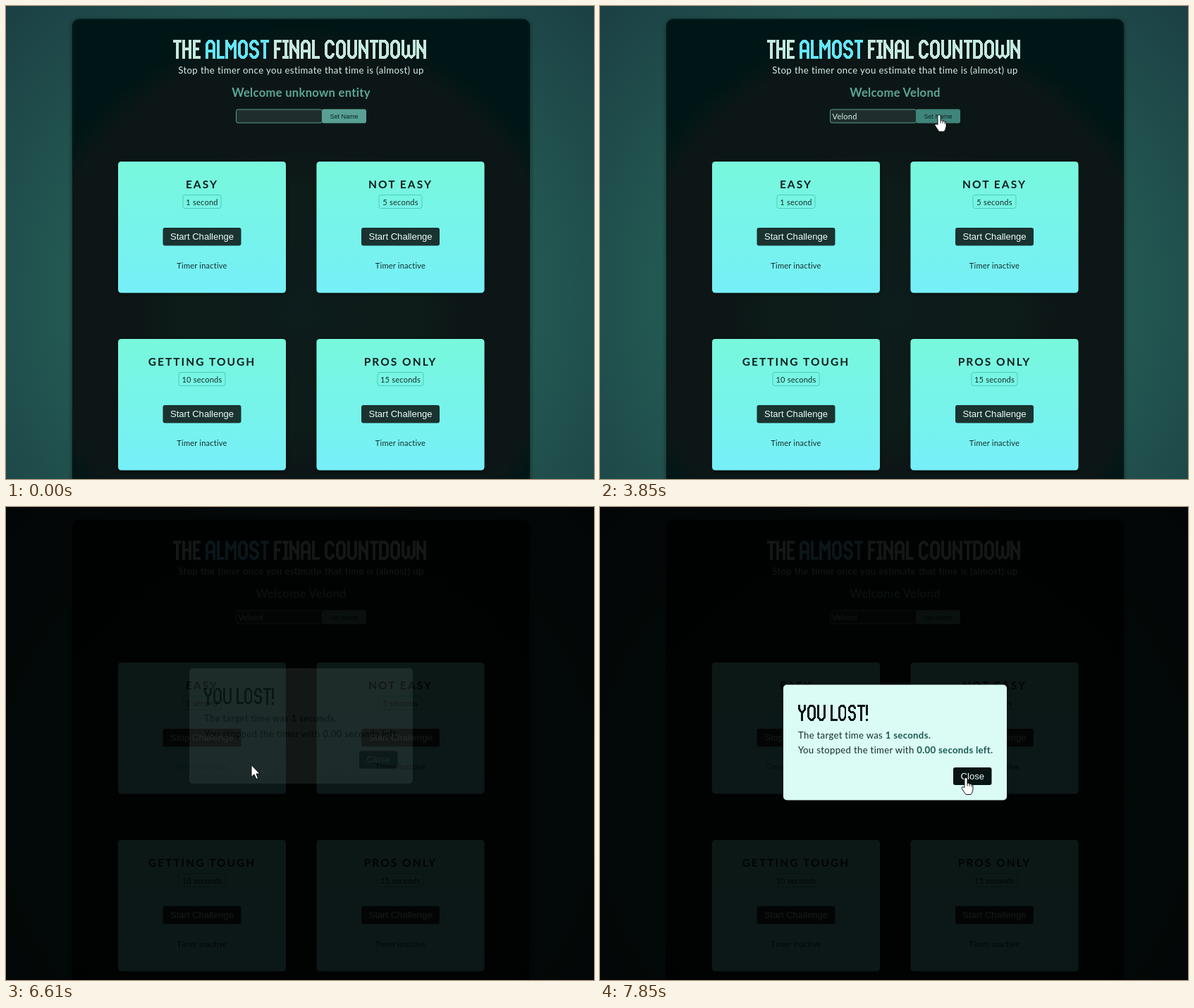
These frames come from a looping animation (834x672 px, 8000 ms). An HTML page:

```html
<!DOCTYPE html>
<html lang="en">
<head>
<meta charset="utf-8">
<title>Countdown challenge</title>
<style>
  html, body { margin: 0; height: 100%; overflow: hidden; background: #1b4246; }
  svg { display: block; width: 100vw; height: 100vh; }
  text { font-family: Lato, sans-serif; fill: #16302d; white-space: pre; }
  .mid { text-anchor: middle; }
  .lead { font-size: 13.2px; letter-spacing: .4px; fill: #d3f0e8; }
  .welcome { font-size: 16.6px; font-weight: 700; letter-spacing: .3px; fill: #5ba797; }
  .level { font-size: 15.5px; font-weight: 700; letter-spacing: 2.05px; fill: #0c1c1a; }
  .small { font-size: 11.1px; letter-spacing: .2px; }
  .button text { font-family: "Liberation Sans", Arial, sans-serif; font-size: 13.07px; fill: #edfcfa; text-anchor: middle; }
  .button rect { fill: #1a3330; }
  .button.hover rect { fill: #061413; }
  .button.set rect { fill: #58a094; }
  .button.set.hover rect { fill: #3f857b; }
  .button.set text { font-size: 9px; fill: #0b2622; }
  .result { font-size: 13.2px; letter-spacing: .3px; }
  .result tspan { font-weight: 700; fill: #195a50; }
  .pixel { fill: none; shape-rendering: crispEdges; }
  .cursor { fill: #fff; stroke: #111; stroke-width: 1; stroke-linejoin: round; }
</style>
</head>
<body>
<svg id="stage" viewBox="0 0 834 672">
  <defs>
    <radialGradient id="page" gradientUnits="userSpaceOnUse" cx="417" cy="410" r="620">
      <stop offset=".5" stop-color="#245a53"/><stop offset="1" stop-color="#1a3c42"/>
    </radialGradient>
    <radialGradient id="panel" gradientUnits="userSpaceOnUse" cx="418" cy="430" r="510">
      <stop offset="0" stop-color="#111d1a"/><stop offset="1" stop-color="#031418"/>
    </radialGradient>
    <linearGradient id="card" x2="0" y2="1">
      <stop offset="0" stop-color="#78f8dc"/><stop offset="1" stop-color="#76eff8"/>
    </linearGradient>
    <filter id="shadow" x="-10%" y="-10%" width="120%" height="120%">
      <feDropShadow dx="0" dy="1" stdDeviation="3" flood-opacity=".55"/>
    </filter>
  </defs>
</svg>
<script>
const LOOP = 8000;
const PLAYER = "Velond";
const stage = document.getElementById("stage");
const byId = id => document.getElementById(id);

// Stroke font on a 27-unit high cell: [advance, path]
const cap = "M2 8V6L5 2H9L12 6V8", cup = "M2 19V21L5 25H9L12 21V19";
const leftSide = "M2 6V21", rightSide = "M12 6V21", stem = "M2 0V27";
const glyphs = {
  T: [13, "M0 2H12M6 2V27"],
  H: [15, stem + "M11 0V27M2 13H11"],
  E: [12, "M11 2H2V25H11M2 13H9"],
  F: [12, "M11 2H2V27M2 13H9"],
  L: [12, "M2 0V25H11"],
  I: [10, "M0 2H9M0 25H9M4.5 2V25"],
  A: [16, cap + "M2 6V27M12 6V27M2 16H12"],
  M: [18, stem + "M14 0V27M2 3L8 12L14 3"],
  N: [16, stem + "M12 0V27M2 5L12 20"],
  O: [16, cap + cup + leftSide + rightSide],
  C: [16, cap + cup + leftSide],
  S: [16, cap + cup + "M2 7V9L5 13H9L12 17V20"],
  U: [16, cup + "M2 0V21M12 0V21"],
  D: [16, "M2 2H9L12 6V21L9 25H2Z"],
  W: [21, "M2 0V21L6 25L10 21V7M10 21L14 25L18 21V0"],
  Y: [15, "M2 0V8L6.5 14V27M11 0V8L6.5 14"],
  "!": [5, "M2 0V18M2 23V27"],
  " ": [6, ""]
};

function pixelText(words, x, y, scale, weight) {
  let pen = 0, out = "";
  for (const [word, color] of words)
    for (const letter of word) {
      const [advance, path] = glyphs[letter];
      out += `<path transform="translate(${pen})" stroke="${color}" d="${path}"/>`;
      pen += advance;
    }
  const label = words.map(w => w[0]).join("");
  return `<g class="pixel" role="img" aria-label="${label}" stroke-width="${weight}"
    transform="translate(${x} ${y}) scale(${scale})">${out}</g>`;
}

const buttons = [];
function button(id, label, x, y, w, h, kind = "") {
  buttons.push({ id, x, y, w, h });
  return `<g id="${id}" class="button ${kind}"><rect x="${x}" y="${y}" width="${w}" height="${h}" rx="3"/>
    <text x="${x + w / 2}" y="${y + h / 2 + (kind ? 3.2 : 4.3)}">${label}</text></g>`;
}

function card(index, title, target, boxWidth) {
  const x = index % 2 ? 440.5 : 159, y = index < 2 ? 221 : 473, mid = x + 119;
  return `<rect x="${x}" y="${y}" width="238" height="186.5" rx="4.5" fill="url(#card)" filter="url(#shadow)"/>
    <text class="mid level" x="${mid}" y="${y + 38}">${title}</text>
    <rect x="${mid - boxWidth / 2}" y="${y + 47.5}" width="${boxWidth}" height="19" rx="3"
      fill="none" stroke="#46c8b8" stroke-width=".9"/>
    <text class="mid small" x="${mid}" y="${y + 61.5}">${target}</text>
    ${button("start" + index, "Start Challenge", mid - 55.5, y + 94, 111, 25.5)}
    <text id="status${index}" class="mid small" x="${mid}" y="${y + 152}">Timer inactive</text>`;
}

stage.innerHTML += `
  <rect width="834" height="672" fill="url(#page)"/>
  <rect x="94" y="18.5" width="649" height="700" rx="10" fill="url(#panel)" filter="url(#shadow)"/>
  ${pixelText([["THE ", "#c4e8dd"], ["ALMOST ", "#62e6fb"], ["FINAL COUNTDOWN", "#c4e8dd"]], 237, 48, 1, 4)}
  <text class="mid lead" x="418.5" y="96">Stop the timer once you estimate that time is (almost) up</text>
  <text id="welcome" class="mid welcome" x="418.5" y="129"></text>
  <rect id="field" fill="#1f2e2c"/>
  ${button("set", "Set Name", 448, 146.5, 63, 20, "set")}
  <text id="typed" class="small" x="329.5" y="160.5" style="fill:#d7f3ec"></text>
  <rect id="caret" y="150" width="1" height="13" fill="#fff"/>
  ${card(0, "EASY", "1 second", 54)}
  ${card(1, "NOT EASY", "5 seconds", 61)}
  ${card(2, "GETTING TOUGH", "10 seconds", 66)}
  ${card(3, "PROS ONLY", "15 seconds", 65)}
  <rect id="backdrop" width="834" height="672" opacity=".9"/>
  <g id="dialog">
    <rect x="260" y="252.5" width="317" height="164" rx="5" fill="#dafcf5"/>
    ${pixelText([["YOU LOST!", "#081412"]], 281, 280.5, .87, 3.3)}
    <text class="result" x="281" y="328.5">The target time was <tspan>1 seconds.</tspan></text>
    <text class="result" x="281" y="350">You stopped the timer with <tspan>0.00 seconds left.</tspan></text>
    ${button("close", "Close", 501, 370, 54.5, 25)}
  </g>
  <circle id="click" r="12.5" fill="#ff0" opacity=".47"/>
  <path id="cursor" class="cursor"/>`;

const shapes = {
  arrow: "M0 0V17L4 13.5L7 20L9.5 19L7 12.5H12Z",
  hand: "M-2 2Q-2 0 0 0T2 2V8Q4 7 5 9Q7 8 8 10Q10 9 10 12V17Q9 22 7 24H0Q-3 20 -6 15Q-6 12 -2 14ZM2 8V12M5 9V12M8 10V13",
  beam: "M-5 -8H-1L0 -7L1 -8H5V-6H1V7H5V9H1L0 8L-1 9H-5V7H-1V-6H-5Z"
};

// Pointer route: time, x, y
const route = [
  [270, 711, 556], [480, 585, 345], [690, 455, 128], [790, 422, 108], [960, 404.5, 156],
  [3160, 404.5, 156], [3340, 481, 154.5],
  [4490, 481, 154.5], [4970, 294, 326.5],
  [6190, 294, 326.5], [6470, 348, 366.5],
  [7440, 348, 366.5], [7850, 519, 384.5]
];
const keyTimes = [1690, 1880, 2080, 2210, 2470, 2620];
const clicks = [[1160, 1360], [3620, 3850], [5370, 5570]];
const within = (t, from, to) => t >= from && t < to;

function pointerAt(t) {
  const next = route.findIndex(p => p[0] > t);
  if (next < 1) return route[next ? route.length - 1 : 0].slice(1);
  const [t0, x0, y0] = route[next - 1], [t1, x1, y1] = route[next];
  const k = (t - t0) / (t1 - t0);
  return [x0 + (x1 - x0) * k, y0 + (y1 - y0) * k];
}

function setAttrs(id, attrs) {
  for (const name in attrs) byId(id).setAttribute(name, attrs[name]);
}

function setText(id, value) {
  const node = byId(id);
  if (node.textContent !== value) node.textContent = value;
}

function show(id, visible) {
  byId(id).style.display = visible ? "" : "none";
}

function render(t) {
  // Name form
  const focused = within(t, 1160, 3620);
  setText("typed", PLAYER.slice(0, keyTimes.filter(k => t >= k).length));
  setText("welcome", "Welcome " + (t < 3850 ? "unknown entity" : PLAYER));
  setAttrs("field", focused
    ? { x: 325.5, y: 146.5, width: 123, height: 20.5, rx: 3, stroke: "#fff", "stroke-width": 1.6 }
    : { x: 326.5, y: 147, width: 122, height: 19, rx: 2.5, stroke: "#58a094", "stroke-width": 1 });
  show("caret", within(t, 1160, 3250));
  setAttrs("caret", { x: 329 + byId("typed").getComputedTextLength() });

  // Running timer
  const running = t >= 5570;
  setText("status0", running ? "Time is running..." : "Timer inactive");
  setAttrs("status0", { opacity: running ? .65 - .35 * Math.cos((t - 5600) / 1000 * 2 * Math.PI) : 1 });
  byId("start0").lastElementChild.textContent = running ? "Stop Challenge" : "Start Challenge";

  // Result dialog
  const open = t >= 6594;
  const eased = 1 - (1 - Math.min(1, Math.max(0, (t - 6594) / 400))) ** 2;
  show("backdrop", open);
  show("dialog", open);
  setAttrs("dialog", { opacity: eased, transform: `translate(0 ${-25.5 * (1 - eased)})` });

  // Pointer
  const [x, y] = pointerAt(t), visible = t >= 270;
  let shape = !open && within(x, 326, 448) && within(y, 146, 167) ? "beam" : "arrow";
  for (const b of buttons) {
    const hover = visible && open === (b.id === "close") && within(x, b.x, b.x + b.w) && within(y, b.y, b.y + b.h);
    byId(b.id).classList.toggle("hover", hover);
    if (hover) shape = "hand";
  }
  show("cursor", visible);
  setAttrs("cursor", { d: shapes[shape], transform: `translate(${x} ${y})` });
  show("click", clicks.some(([from, to]) => within(t, from, to)));
  setAttrs("click", { cx: x, cy: y });
}

const begin = performance.now();
function tick() {
  render((performance.now() - begin) % LOOP);
  requestAnimationFrame(tick);
}
tick();
</script>
</body>
</html>
```
